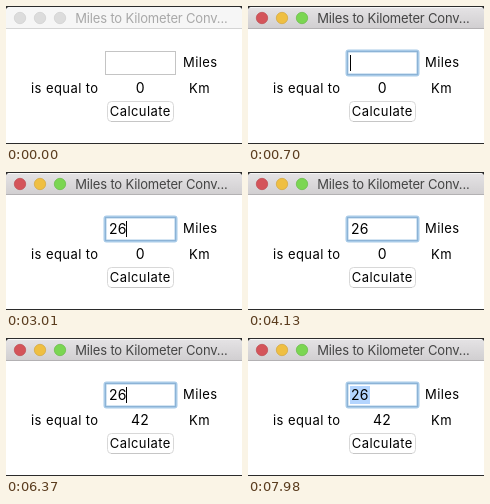
An HTML page that plays this animation: 236 px wide and 138 px high, repeating every 8000 ms.

```html
<!DOCTYPE html>
<html lang="en">
<head>
<meta charset="utf-8">
<title>Miles to Kilometer Converter</title>
<style>
  html, body { margin: 0; width: 100%; height: 100%; overflow: hidden; background: #2b2b2b; }
  svg { display: block; width: 236px; height: 138px; }
  text { font: 13px Inter, "Open Sans", sans-serif; letter-spacing: .42px; fill: #000; }
  .title { letter-spacing: -.17px; fill: #444; }
  .inactive .title { fill: #a8a8a8; }
  .number { font-size: 14px; letter-spacing: .1px; }
  .crisp { shape-rendering: crispEdges; }

  /* Every change is a hard cut: 1% of the loop is 80 ms. */
  .inactive, .active, .two, .six, .zero, .result, .selection, .caret, .caret rect {
    animation: 8s step-end infinite;
  }
  .inactive { animation-name: until-focus; }
  .active { animation-name: from-focus; }
  .two { animation-name: type-two; }
  .six { animation-name: type-six; }
  .zero { animation-name: until-result; }
  .result { animation-name: from-result; }
  .selection { animation-name: select; }
  .caret { animation-name: advance; }
  .caret rect { animation-name: blink; }

  @keyframes until-focus { 0% { opacity: 1 } 8.75%, 100% { opacity: 0 } }
  @keyframes from-focus { 0% { opacity: 0 } 8.75%, 100% { opacity: 1 } }
  @keyframes type-two { 0% { opacity: 0 } 26.25%, 100% { opacity: 1 } }
  @keyframes type-six { 0% { opacity: 0 } 37.625%, 100% { opacity: 1 } }
  @keyframes until-result { 0% { opacity: 1 } 60.375%, 100% { opacity: 0 } }
  @keyframes from-result { 0% { opacity: 0 } 60.375%, 100% { opacity: 1 } }
  @keyframes select { 0% { opacity: 0 } 96.25%, 100% { opacity: 1 } }
  @keyframes advance {
    0% { transform: none }
    26.25% { transform: translateX(9px) }
    37.625%, 100% { transform: translateX(18px) }
  }
  @keyframes blink {
    0%, 16.625%, 28%, 40.25%, 51.625%, 63.875%, 75.25%, 87.5%, 99.75%, 100% { opacity: 0 }
    8.75%, 20.125%, 32.375%, 43.75%, 56%, 67.375%, 79.625%, 91% { opacity: 1 }
  }
</style>
</head>
<body>
<svg viewBox="0 0 236 138">
  <defs>
    <linearGradient id="bar" x2="0" y2="1">
      <stop stop-color="#e6e4e6"/>
      <stop offset="1" stop-color="#d1cfd1"/>
    </linearGradient>
    <clipPath id="window">
      <path d="M0 137V5a4 4 0 0 1 4-4H232a4 4 0 0 1 4 4V137Z"/>
    </clipPath>
  </defs>
  <rect width="236" height="138" fill="#2b2b2b"/>

  <g clip-path="url(#window)">
    <rect width="236" height="138" fill="#fff"/>

    <g class="inactive">
      <rect class="crisp" width="236" height="22" fill="#f6f6f6"/>
      <rect class="crisp" y="22" width="236" height="1" fill="#d4d4d4"/>
      <g fill="#dcdcdc" stroke="#cfcfcf" stroke-width=".7">
        <circle cx="14" cy="12" r="5.7"/>
        <circle cx="34" cy="12" r="5.7"/>
        <circle cx="54" cy="12" r="5.7"/>
      </g>
      <text class="title" x="69.3" y="17">Miles to Kilometer Conv...</text>
      <rect x="99.5" y="45.5" width="70" height="23" fill="#fff" stroke="#c4c4c4"/>
    </g>

    <g class="active">
      <rect class="crisp" width="236" height="22" fill="url(#bar)"/>
      <rect class="crisp" y="1" width="236" height="1" fill="#f6f6f6"/>
      <rect class="crisp" y="22" width="236" height="1" fill="#b3b1b3"/>
      <g stroke-width=".7">
        <circle cx="14" cy="12" r="5.7" fill="#d4545a" stroke="#bd4a50"/>
        <circle cx="34" cy="12" r="5.7" fill="#efbf42" stroke="#d3a73b"/>
        <circle cx="54" cy="12" r="5.7" fill="#7bd652" stroke="#68ba45"/>
      </g>
      <text class="title" x="69.3" y="17">Miles to Kilometer Conv...</text>
      <rect x="99" y="45" width="71" height="24" rx="1.5" fill="#fff" stroke="#a9cbe8" stroke-width="3"/>
      <rect x="99.5" y="45.5" width="70" height="23" fill="none" stroke="#8cb3d6"/>
    </g>

    <rect class="selection crisp" x="102" y="48" width="20" height="18" fill="#b4d5fe"/>
    <text class="number two" x="103" y="62">2</text>
    <text class="number six" x="111.7" y="62">6</text>
    <g class="caret"><rect class="crisp" x="102" y="49" width="1" height="16"/></g>

    <text x="177" y="61">Miles</text>
    <text x="25" y="87">is equal to</text>
    <text class="number zero" x="129.7" y="87">0</text>
    <text class="number result" x="125" y="87">42</text>
    <text x="183" y="87">Km</text>

    <rect x="101.5" y="95.5" width="66" height="20" rx="4" fill="#fff" stroke="#d8d8d8"/>
    <path class="crisp" d="M105 115.5H164" stroke="#c6c6c6"/>
    <text x="103.8" y="110">Calculate</text>
  </g>
</svg>
</body>
</html>
```
